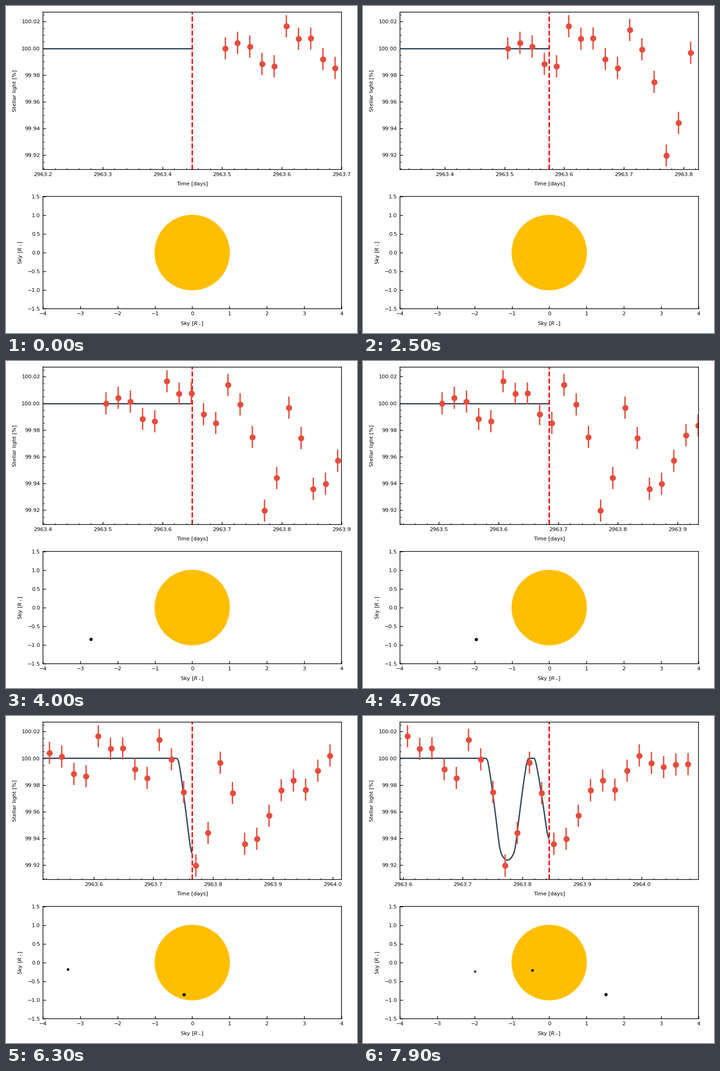
Animation, 751 px wide and 700 px high, one loop 8 s. Source, as a matplotlib script:

```python
import numpy as np
import matplotlib.pyplot as plt
from matplotlib.animation import FuncAnimation
from matplotlib.patches import Circle
from matplotlib.ticker import MultipleLocator

W, H = 751, 700
FRAMES, INTERVAL = 80, 100
DAY0 = 2963            # times below are days after this date
START, STEP, HALF = 0.45, 0.005, 0.25
CADENCE = 0.02043
DARKENING = 0.7
LW = 2.05

# radius, impact parameter, orbit radius, angular speed, mid-transit time
PLANETS = [
    (0.0343, 0.858, 20.0, 1.0875, 0.7750),
    (0.0263, 0.211, 7.0, 5.39, 0.8569),
    (0.0190, 0.2435, 14.0, 1.871, 0.9210),
]

plt.rcParams.update({
    "font.family": "DejaVu Sans", "font.size": 8.2, "axes.linewidth": 1.03,
})


def position(planet, t):
    """Sky x, sky y and whether the planet is on the near side."""
    _, b, a, speed, mid = planet
    angle = speed * (t - mid)
    return a * np.sin(angle), -b * np.cos(angle), np.cos(angle) > 0


def light_loss(planet, t):
    """Percent of light blocked, averaged over one exposure."""
    rp = planet[0]
    shifts = np.linspace(-0.5, 0.5, 81) * CADENCE
    x, y, near = position(planet, t[:, None] + shifts)
    r = np.hypot(x, y)
    cover = np.clip((1 + rp - r) / (2 * rp), 0, 1)
    cover = near * cover ** 2 * (3 - 2 * cover)
    mu = np.sqrt(np.clip(1 - r ** 2, 0, 1))
    return (100 * rp ** 2 * cover * (1 - DARKENING * (1 - mu))).mean(axis=1)


def panel(left, top, right, bottom):
    ax = fig.add_axes([left / W, 1 - bottom / H, (right - left) / W, (bottom - top) / H])
    ax.tick_params(which="major", direction="in", length=4.1, width=1.03, pad=4.4)
    ax.tick_params(which="minor", direction="in", length=2.05, width=0.8)
    for spine in ax.spines.values():
        spine.set_snap(False)
    return ax


def label(x, y, text, rotation=0):
    fig.text(x / W, 1 - y / H, text, rotation=rotation, rotation_mode="anchor",
             ha="center", va="baseline")


fig = plt.figure(figsize=(W / 100, H / 100), dpi=100, facecolor="white")

# Light curve
curve = panel(79.15, 13.15, 717.75, 350)
curve.set_ylim(99.90927, 100.02705)
curve.xaxis.set_major_locator(MultipleLocator(0.1))
curve.xaxis.set_minor_locator(MultipleLocator(0.02))
curve.yaxis.set_major_locator(MultipleLocator(0.02))
curve.yaxis.set_minor_locator(MultipleLocator(0.005))
curve.xaxis.set_major_formatter(lambda x, _: f"{DAY0 + x:.1f}")
curve.yaxis.set_major_formatter(lambda y, _: f"{y:.2f}")
label(398.4, 384.2, "Time [days]")
label(22.1, 181.8, "Stellar light [%]", 90)

model_t = np.arange(100, 431) * 0.002
model_y = 100 - sum(light_loss(p, model_t) for p in PLANETS)

# deviations from 100 % in units of 0.0001 %
offsets = np.array([
    0, 41, 13, -117, -134, 165, 71, 74, -81, -147, 137, -8, -252, -803, -559,
    -33, -260, -640, -602, -430, -239, -166, -235, -93, 21, -35, -66, -46, -43])
obs_t = 0.5055 + CADENCE * np.arange(len(offsets))
obs_y = 100 + offsets * 1e-4
ERROR = 0.0083

model, = curve.plot([], [], color="#34495e", lw=LW, zorder=2)
curve.plot([0.5, 0.5], [0, 1], "--", color="red", lw=LW, zorder=2.1, snap=False,
           transform=curve.transAxes)
bars, = curve.plot([], [], color="#e74c3c", lw=LW, solid_capstyle="butt",
                   snap=False, zorder=2.2)
dots, = curve.plot([], [], "o", color="#e74c3c", ms=8.2, mew=1.03, snap=False,
                   zorder=2.3)

# Sky view
sky = panel(79.15, 407.6, 717.75, 648.05)
sky.set_xlim(-4, 4)
sky.set_ylim(-1.5, 1.5)
sky.xaxis.set_major_locator(MultipleLocator(1))
sky.yaxis.set_major_locator(MultipleLocator(0.5))
label(398.5, 683.2, r"Sky [$R_\star$]")
label(33.8, 527.8, r"Sky [$R_\star$]", 90)

sky.add_patch(Circle((0, 0), 1, color="#ffbf00", lw=1.03, zorder=1))
discs = [sky.add_patch(Circle((0, 0), p[0], color="black", lw=1.03, zorder=2))
         for p in PLANETS]


def update(i):
    now = START + STEP * i
    lo, hi = now - HALF, now + HALF
    curve.set_xlim(lo, hi)

    past = model_t <= now + 1e-9
    model.set_data(model_t[past], model_y[past])

    seen = (obs_t >= lo) & (obs_t <= hi)
    t, y = obs_t[seen], obs_y[seen]
    dots.set_data(t, y)
    gaps = np.full_like(y, np.nan)
    bars.set_data(np.repeat(t, 3), np.column_stack([y - ERROR, y + ERROR, gaps]).ravel())

    for disc, planet in zip(discs, PLANETS):
        x, y, near = position(planet, now)
        disc.center = x, y
        disc.set_visible(bool(near))
    return [model, bars, dots, *discs]


anim = FuncAnimation(fig, update, frames=FRAMES, interval=INTERVAL,
                     repeat=True, repeat_delay=0, blit=False)
plt.show()
```
